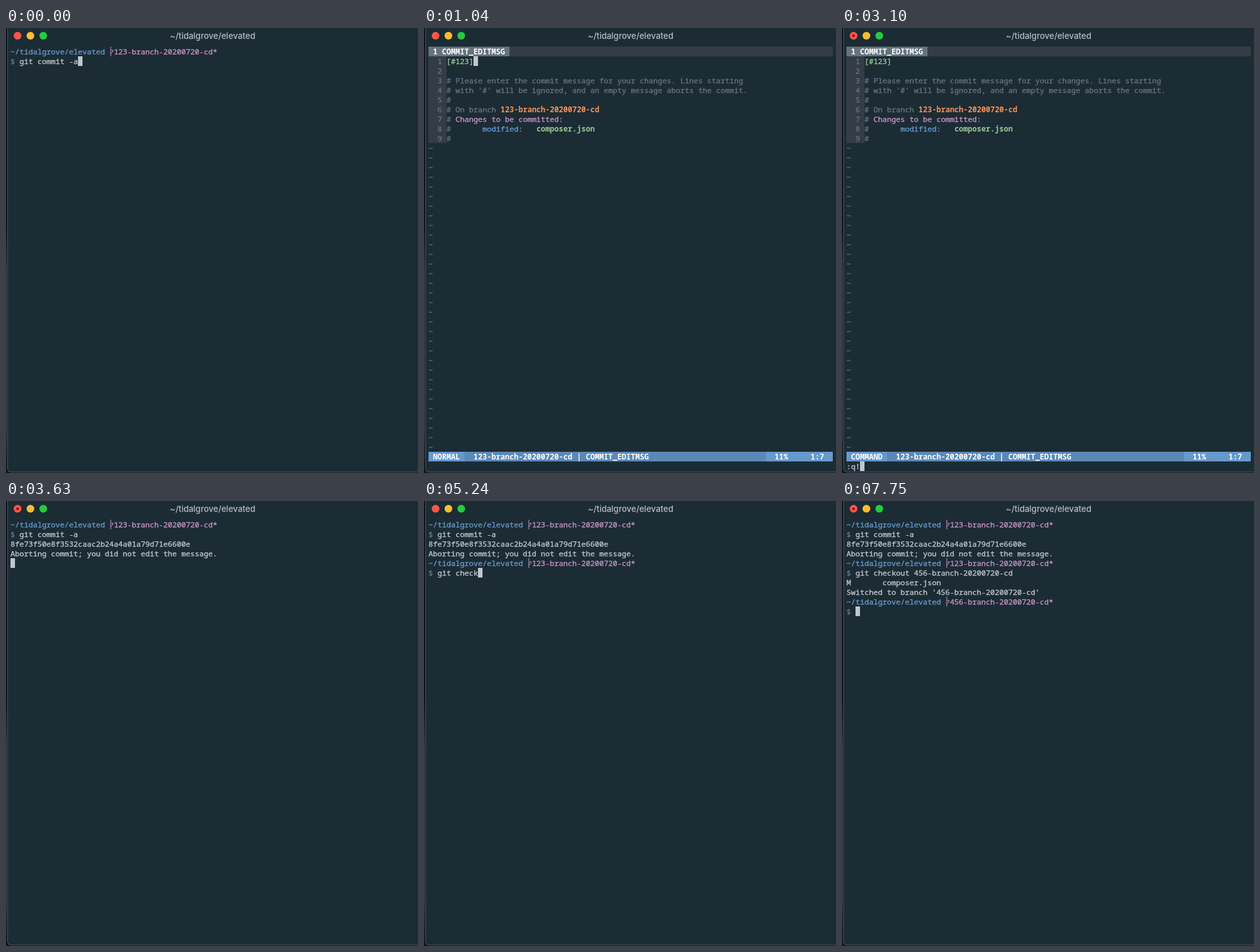
These frames come from a looping animation (641 by 692 pixels, 8 s). An HTML page:

```html
<!DOCTYPE html>
<html lang="en">
<head>
<meta charset="utf-8">
<title>Terminal</title>
<style>
  html, body { margin: 0; width: 100%; height: 100%; overflow: hidden; background: #0e151d; }
  #stage { position: absolute; inset: 0; overflow: hidden; contain: strict; }
  #edge {
    position: absolute; left: 0; top: 0; width: 1px; height: 100%;
    background: linear-gradient(transparent 45%, #4a5058 55%, #4a5058 90%, transparent);
  }
  #window {
    position: absolute; left: 2px; right: 0; top: 0; height: 690px;
    border: solid #46545f; border-width: 0 0 1px 1px;
    border-radius: 0 0 0 6px; background: #1c2c34;
  }
  #title {
    position: absolute; left: 2px; right: 0; top: 4px; margin: 0;
    font: 500 13px/16px Inter, sans-serif; color: #b7bec2; text-align: center;
  }
  .light { position: absolute; top: 6px; width: 12px; height: 12px; border-radius: 50%; }
  #unsaved {
    position: absolute; left: 16px; top: 10px; width: 4px; height: 4px;
    border-radius: 50%; background: #7e0508;
  }
  #screen {
    position: absolute; left: 7px; top: 29px; width: 630px; height: 660px; margin: 0;
    overflow: hidden; color: #c0c5ce;
    font: 500 11.667px/15px "Noto Sans Mono", monospace;
    font-variant-ligatures: none; -webkit-text-stroke: .35px;
  }
  #screen span, #screen svg, #screen i {
    display: inline-block; height: 15px; vertical-align: top;
  }
  #screen i { width: 7px; background: #c0c5ce; }
  #screen svg { width: 7px; fill: none; stroke: #c594c5; }
  .dim { color: #65737e; }
  .blue { color: #6699cc; }
  .pink { color: #c594c5; }
  .green { color: #99c794; }
  .orange { color: #f99157; }
  .bold, .tab, .mode, .info { font-weight: 700; -webkit-text-stroke: 0; }
  .gutter { color: #65737e; background: #343d46; }
  .tab { color: #fff; background: #65737e; }
  .tabline { background: #343d46; }
  .mode { color: #fff; background: #6699cc; }
  .info { color: #fff; background: #5b89b7; }
</style>
</head>
<body>
<div id="stage">
  <div id="edge"></div>
  <div id="window"></div>
  <div class="light" style="left:12px;background:#ff544d"></div>
  <div class="light" style="left:32px;background:#fdbd2e"></div>
  <div class="light" style="left:52px;background:#23cc40"></div>
  <div id="unsaved" hidden></div>
  <p id="title">~/tidalgrove/elevated</p>
  <pre id="screen"></pre>
</div>
<script>
const LOOP = 8000;
const screen = document.getElementById('screen');
const unsaved = document.getElementById('unsaved');

const paint = (style, text) => `<span class="${style}">${text}</span>`;
const cursor = '<i></i>';
const branchIcon = '<svg viewBox="0 0 7 15"><path d="M2 0V15M2 11L5.5 7M3 5.5H5.5V8"/></svg>';
const branch = id => `${id}-branch-20200720-cd`;

const prompt = id =>
  paint('blue', '~/tidalgrove/elevated') + ' ' + branchIcon +
  paint('pink', branch(id) + '*') + '\n' + paint('dim', '$') + ' ';

const commit = prompt(123) + 'git commit -a';
const hash = commit + '\n8fe73f50e8f3532caac2b24a4a01a79d71e6600e\n';
const aborted = hash + 'Aborting commit; you did not edit the message.\n';
const ready = aborted + prompt(123);
const checkout = ready + `git checkout ${branch(456)}`;
const switched = checkout + `\nM       composer.json\nSwitched to branch '${branch(456)}'\n`;

function editor(mode, command) {
  const message = [
    paint('green', '[#123]') + (command ? '' : cursor),
    '',
    paint('dim', '# Please enter the commit message for your changes. Lines starting'),
    paint('dim', "# with '#' will be ignored, and an empty message aborts the commit."),
    paint('dim', '#'),
    paint('dim', '# On branch ') + paint('orange bold', branch(123)),
    paint('dim', '# ') + paint('pink', 'Changes to be committed:'),
    paint('dim', '#       ') + paint('blue', 'modified:   ') + paint('green bold', 'composer.json'),
    paint('dim', '#'),
  ].map((line, i) => paint('gutter', `  ${i + 1} `) + line);
  const label = ` ${mode} `;
  const info = `  ${branch(123)} | COMMIT_EDITMSG`;
  return [
    paint('tab', ' 1 COMMIT_EDITMSG ') + paint('tabline', ' '.repeat(72)),
    ...message,
    ...Array(32).fill(paint('dim', '~')),
    paint('mode', label) + paint('info', info.padEnd(75 - label.length)) +
      paint('mode', '  11%     1:7  '),
    command ? command + cursor : '',
  ].join('\n');
}

const typed = [
  [4350, 'g'], [4440, 'gi'], [4530, 'git'], [4620, 'git '], [4800, 'git ch'],
  [4970, 'git che'], [5150, 'git chec'], [5240, 'git check'], [5510, 'git checko'],
  [5690, 'git checkou'], [5780, 'git checkout '], [6410, 'git checkout 4'],
].map(([time, text]) => [time, ready + text + cursor]);

const states = [
  [0, commit + cursor],
  [500, commit + '\n' + cursor],
  [680, hash + cursor],
  [860, cursor],
  [1040, editor('NORMAL')],
  [2470, editor('COMMAND', ':')],
  [2830, editor('COMMAND', ':q')],
  [3100, editor('COMMAND', ':q!')],
  [3630, aborted + cursor],
  [3900, ready + cursor],
  ...typed,
  [6680, checkout + ' ' + cursor],
  [7300, checkout + '\n' + cursor],
  [7480, switched + cursor],
  [7750, switched + prompt(456) + cursor],
];

const start = performance.now();
let shown;

function draw() {
  const time = (performance.now() - start) % LOOP;
  const state = states.findLast(([from]) => from <= time);
  if (state !== shown) {
    screen.innerHTML = state[1];
    shown = state;
  }
  unsaved.hidden = !(time >= 1220 && time < 4350 || time >= 7750);
  requestAnimationFrame(draw);
}
draw();
</script>
</body>
</html>
```
